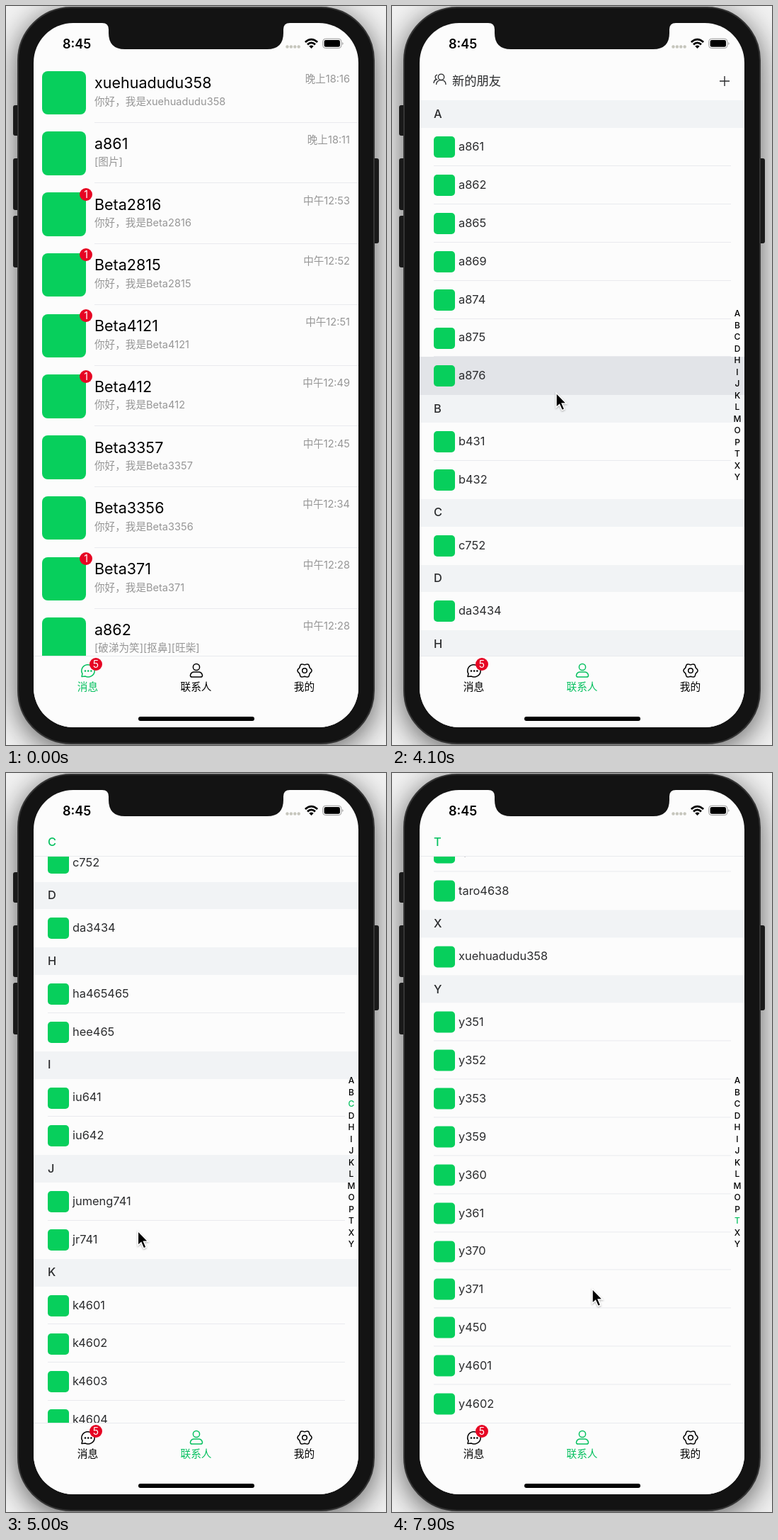
Write an HTML page that moves like this. It is 537x1043 px and loops after 8 s.

```html
<!DOCTYPE html>
<html lang="zh">
<head>
<meta charset="utf-8">
<title>Chat</title>
<style>
* { box-sizing: border-box; }
html, body { margin: 0; width: 100%; height: 100%; overflow: hidden; }
body { position: relative; background: #f2f2f2; font-family: Inter, "Noto Sans CJK SC", "Noto Sans CJK", sans-serif; color: #000; }
#stage { position: absolute; left: 0; top: 0; width: 537px; height: 1043px; overflow: hidden; }
#stage div, #stage svg, #stage span { position: absolute; white-space: nowrap; }
#phone { left: 16px; top: 1px; width: 505px; height: 1041px; border-radius: 76px; background: #131313; border: 2px solid #343434; box-shadow: 0 8px 42px rgba(0,0,0,.62); }
.key { background: #242424; border-radius: 3px; }
#screen { left: 39px; top: 24px; width: 459px; height: 994px; border-radius: 56px; background: #fcfcfc; overflow: hidden; }
.page { left: 0; top: 55px; width: 459px; height: 838px; overflow: hidden; }
.mid { transform: translateY(-50%); line-height: 1.2; }
.pic { background: #07cf5c; }
.name { left: 86px; font-size: 21.5px; }
.text { left: 86px; font-size: 14.6px; color: #969696; }
.time { right: 12px; font-size: 14.6px; color: #969696; }
.line { height: 1px; background: #e9eaee; }
.badge { width: 18px; height: 18px; border-radius: 9px; background: #e60523; color: #fff; font-size: 14px; line-height: 18px; text-align: center; }
#list { left: 0; top: 0; width: 459px; }
.row, .head { left: 0; width: 459px; }
.row { height: 53.9px; font-size: 16.4px; color: #2b2c2e; }
.row.on { background: #e2e4e8; }
.head { height: 38.75px; background: #f1f3f5; font-size: 16.4px; font-weight: 500; color: #2b2c2e; }
.head .mid { left: 20px; top: 50%; }
#sticky { background: #fcfcfc; color: #07c160; border-bottom: 1px solid #e9eaee; }
#index span { font-size: 12px; font-weight: 500; transform: translate(-50%, -50%); }
.tab { top: 0; width: 153px; height: 80px; text-align: center; }
.tab .mid { left: 0; width: 153px; top: 44px; font-size: 14.7px; }
.tab svg { left: 64.5px; top: 8px; fill: none; stroke: currentColor; stroke-width: 1.5; }
</style>
</head>
<body>
<div id="stage">
  <div class="key" style="left:10px;top:140px;width:10px;height:43px"></div>
  <div class="key" style="left:10px;top:215px;width:10px;height:73px"></div>
  <div class="key" style="left:10px;top:296px;width:10px;height:73px"></div>
  <div class="key" style="left:517px;top:215px;width:10px;height:120px"></div>
  <div id="phone"></div>
  <div id="screen">
    <div class="page" id="chats"></div>
    <div class="page" id="people">
      <div id="list"></div>
      <div class="head" id="sticky" style="top:0"><span class="mid"></span></div>
      <div id="index"></div>
    </div>
    <div id="tabs" style="left:0;top:893px;width:459px;height:101px;background:#fcfcfc;border-top:1px solid #e9eaee"></div>
    <div style="left:148px;top:979px;width:164px;height:6px;border-radius:3px;background:#000"></div>
  </div>
  <svg width="537" height="80" style="left:0;top:0">
    <path d="M136 23V24Q145 24 145 33V38Q145 61 168 61H369Q392 61 392 38V33Q392 24 401 24V23Z" fill="#131313"/>
    <g fill="#c6c6bd"><circle cx="397.5" cy="57.5" r="2.2"/><circle cx="402.9" cy="57.5" r="2.2"/><circle cx="408.3" cy="57.5" r="2.2"/><circle cx="413.7" cy="57.5" r="2.2"/></g>
    <g fill="none" stroke="#000" stroke-width="2.8"><path d="M422.9 51Q431.5 43.2 440.1 51M426 54.4Q431.5 49.4 437 54.4"/></g>
    <path d="M428.3 56.8Q431.5 54 434.7 56.8L431.5 60Z"/>
    <rect x="447.7" y="46.2" width="26.2" height="13.4" rx="4" fill="none" stroke="#999"/>
    <rect x="449.6" y="48.1" width="22.4" height="9.6" rx="2.3"/>
    <path d="M475.3 51Q478 53 475.3 55Z" fill="#999"/>
  </svg>
  <span class="mid" style="left:80px;top:53.5px;font-size:18px;font-weight:600">8:45</span>
  <svg id="cursor" width="22" height="30" viewBox="-2 -2 22 30" style="left:-2px;top:-2px;filter:drop-shadow(0 1px 1px rgba(0,0,0,.3))">
    <path d="M0 0V20.5L4.6 16.4L8.2 24.6L11.8 23L8.3 15H14.6Z" stroke="#fff" stroke-width="1.5"/>
  </svg>
</div>
<script>
const LOOP = 8000, STEP = 100, ROW = 53.9, HEAD = 38.75, FIRST = 54.3, VIEW = 838.5;
const GREEN = '#07c160';
const $ = id => document.getElementById(id);

function add(parent, cls, css, text = '') {
  const el = document.createElement('div');
  el.className = cls;
  el.style.cssText = css;
  el.textContent = text;
  parent.append(el);
  return el;
}

// Conversations: name, message, time, unread
const hi = '你好，我是';
[
  ['xuehuadudu358', 0, '晚上18:16'],
  ['a861', '[图片]', '晚上18:11'],
  ['Beta2816', 0, '中午12:53', 1],
  ['Beta2815', 0, '中午12:52', 1],
  ['Beta4121', 0, '中午12:51', 1],
  ['Beta412', 0, '中午12:49', 1],
  ['Beta3357', 0, '中午12:45'],
  ['Beta3356', 0, '中午12:34'],
  ['Beta371', 0, '中午12:28', 1],
  ['a862', '[破涕为笑][抠鼻][旺柴]', '中午12:28']
].forEach(([name, text, time, unread], i) => {
  const y = 12.7 + i * 85.75, box = $('chats');
  add(box, 'pic', `left:12px;top:${y}px;width:61.5px;height:61.5px;border-radius:8px`);
  add(box, 'name mid', `top:${y + 17.3}px`, name);
  add(box, 'text mid', `top:${y + 43.8}px`, text || hi + name);
  add(box, 'time mid', `top:${y + 12.5}px`, time);
  add(box, 'line', `left:86px;right:0;top:${y + 72}px`);
  if (unread) add(box, 'badge', `left:65px;top:${y - 6.5}px`, unread);
});

// Contacts, grouped by first letter
const people = ('a861 a862 a865 a869 a874 a875 a876 b431 b432 c752 da3434 ha465465 hee465 iu641 iu642 jumeng741 jr741 ' +
  Array.from({ length: 14 }, (_, i) => 'k' + (4601 + i)).join(' ') +
  ' lo531 lo532 mi264 mi265 mi268 ou731 pa642 pa643 taro4635 taro4636 taro4637 taro4638 xuehuadudu358 ' +
  'y351 y352 y353 y359 y360 y361 y370 y371 y450 y4601 y4602').split(' ');
const list = $('list'), rows = {}, sections = [];
const friends = add(list, '', 'left:0;top:0;width:459px;height:54px');
friends.innerHTML = `<svg width="22" height="20" viewBox="0 0 22 20" style="left:18px;top:15px" fill="none" stroke="#2b2c2e" stroke-width="1.3">
  <circle cx="12.5" cy="6.3" r="4.2"/><path d="M5.5 17Q6 10.7 12.5 10.7T19 17M7 3.2Q3.4 4 4.3 7.5Q4.8 9 6 9.5Q2.3 10.5 2 15"/></svg>
  <span class="mid" style="left:46px;top:27px;font-size:17.3px;color:#2b2c2e">新的朋友</span>
  <svg width="16" height="16" style="left:423px;top:19px" stroke="#2b2c2e" stroke-width="1.4"><path d="M8 1V15M1 8H15"/></svg>`;
let y = FIRST;
people.forEach((name, i) => {
  const letter = name[0].toUpperCase();
  if (!sections.some(s => s.letter === letter)) {
    sections.push({ letter, top: y });
    add(add(list, 'head', `top:${y}px`), 'mid', '', letter);
    y += HEAD;
  }
  const row = rows[name] = add(list, 'row', `top:${y}px`);
  add(row, 'pic', 'left:19.5px;top:12px;width:30px;height:30px;border-radius:5px');
  add(row, 'mid', 'left:55px;top:50%', name);
  if (people[i + 1] && people[i + 1][0] === name[0]) add(row, 'line', 'left:20px;width:420px;bottom:0');
  y += ROW;
});
const END = y - VIEW;
sections.forEach((s, i) => {
  s.mark = document.createElement('span');
  s.mark.textContent = s.letter;
  s.mark.style.cssText = `left:449px;top:${354 + i * 16.5}px`;
  $('index').append(s.mark);
});

// Tab bar
const gear = Array.from({ length: 49 }, (_, i) => {
  const a = i * Math.PI / 24, r = 9.2 + .9 * Math.cos(6 * a);
  return (12 + r * Math.cos(a)).toFixed(2) + ' ' + (12 + r * Math.sin(a)).toFixed(2);
}).join('L');
const tabs = [
  ['消息', '<path d="M3 20.4L4 16.5A9.2 8.6 0 1 1 8 20Z" stroke-linejoin="round"/><g fill="currentColor" stroke="none"><circle cx="8" cy="12.5" r="1.3"/><circle cx="12.2" cy="12.5" r="1.3"/><circle cx="16.4" cy="12.5" r="1.3"/></g>'],
  ['联系人', '<circle cx="12" cy="7" r="4.6"/><path d="M3.5 18.5Q4.5 14 9 14H15Q19.500 14 20.500 18.500Q20.700 21 18 21H6Q3.300 21 3.500 18.500Z"/>'],
  ['我的', `<path d="M${gear}Z"/><circle cx="12" cy="12" r="3.3"/>`]
].map(([label, icon], i) => {
  const tab = add($('tabs'), 'tab', `left:${i * 153}px`);
  tab.innerHTML = `<svg width="24" height="24">${icon}</svg><span class="mid">${label}</span>`;
  return tab;
});
add($('tabs'), 'badge', 'left:79px;top:2px', 5);

// Motion tables: time, value(s)
const scrollKeys = [[0, 0], [4100, 0], [4200, 80], [4300, 190], [4600, 405], [4800, 530], [5000, 635], [5200, 710],
  [5400, 760], [5500, 780], [5600, 805], [5700, 860], [5800, 920], [6000, 980], [6200, 1005], [6500, 1014.7], [7000, 1014.7], [7000, END]];
const cursorKeys = [[1000, 330, 1043], [1300, 285, 960], [1600, 276, 941], [2200, 276, 941], [2900, 240, 565], [3500, 232, 546],
  [4100, 232, 546], [4300, 215, 400], [4600, 199, 559], [5200, 180, 690], [5500, 175, 690], [5700, 170, 633], [5900, 175, 560],
  [6300, 380, 610], [6800, 497, 645], [7100, 488, 660], [7900, 283, 728]];

function at(keys, t) {
  let i = keys.length - 1;
  while (i > 0 && keys[i][0] > t) i--;
  const a = keys[i], b = keys[i + 1];
  if (!b || t < a[0]) return a.slice(1);
  const k = (t - a[0]) / (b[0] - a[0]);
  return a.slice(1).map((v, n) => v + (b[n + 1] - v) * k);
}

function draw(t) {
  const contacts = t >= 2000;
  $('chats').style.display = contacts ? 'none' : '';
  $('people').style.display = contacts ? '' : 'none';
  tabs.forEach((tab, i) => tab.style.color = i === +contacts ? GREEN : '#000');

  const [scroll] = at(scrollKeys, t);
  list.style.transform = `translateY(${-scroll}px)`;
  rows.a876.classList.toggle('on', t >= 4000 && t < 4300);
  rows.k4604.classList.toggle('on', t >= 5500 && t < 5800);

  const active = sections.filter(s => s.top <= scroll).length - 1;
  const next = sections[active + 1], sticky = $('sticky');
  sticky.style.display = active < 0 ? 'none' : '';
  if (active >= 0) {
    sticky.firstChild.textContent = sections[active].letter;
    sticky.style.transform = `translateY(${next ? Math.min(0, next.top - scroll - HEAD) : 0}px)`;
  }
  sections.forEach((s, i) => s.mark.style.color = i === active ? GREEN : '#000');

  const [cx, cy] = at(cursorKeys, t);
  $('cursor').style.display = t < 1000 ? 'none' : '';
  $('cursor').style.transform = `translate(${cx}px, ${cy}px)`;
}

const start = performance.now();
function tick() {
  const t = (performance.now() - start) % LOOP;
  draw(Math.floor(t / STEP) * STEP);
  requestAnimationFrame(tick);
}
tick();
</script>
</body>
</html>
```
